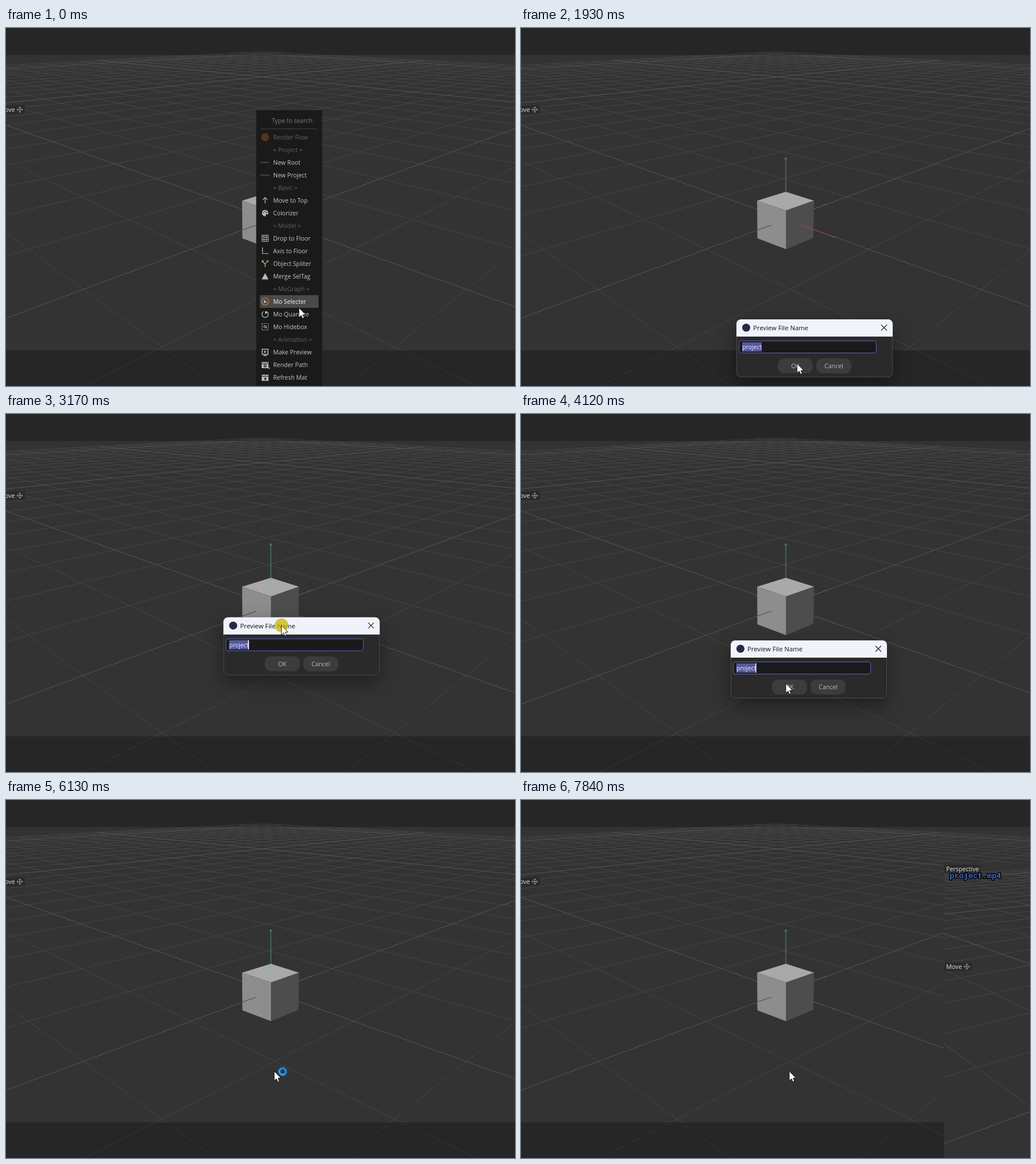
An HTML page for the animation above (8000 ms loop, 886 px wide and 623 px high).

```html
<!DOCTYPE html>
<html lang="en">
<head>
<meta charset="utf-8">
<title>Preview export</title>
<style>
html, body { margin: 0; width: 100%; height: 100%; overflow: hidden; background: #333; }
svg { display: block; width: 886px; height: 623px; }
text { font: 10.5px "Open Sans", "Noto Sans", sans-serif; white-space: pre; }
#dialog { filter: drop-shadow(0 12px 16px rgba(0,0,0,.4)); }
</style>
</head>
<body>
<svg id="stage" viewBox="0 0 886 623" fill="none"></svg>
<script>
const LOOP = 8000;

const rect = (x, y, w, h, fill, extra = '') =>
  `<rect x="${x}" y="${y}" width="${w}" height="${h}" fill="${fill}" ${extra}/>`;
const text = (x, y, str, fill, extra = '') =>
  `<text x="${x}" y="${y}" fill="${fill}" ${extra}>${str}</text>`;
const line = (d, color, width = 1, extra = '') =>
  `<path d="${d}" stroke="${color}" stroke-width="${width}" ${extra}/>`;
const shape = (d, fill) => `<path d="${d}" fill="${fill}"/>`;
const disc = (x, y, r, fill) => `<circle cx="${x}" cy="${y}" r="${r}" fill="${fill}"/>`;
const group = (id, body, extra = '') => `<g id="${id}" ${extra}>${body}</g>`;

// Perspective floor: unit cells (a, b) projected to the screen.
function project(a, b) {
  const depth = 1 / (0.002912 - 0.0003807 * (a + b));
  return `${(440.3 + depth * (0.0596 + 0.3585 * (a - b))).toFixed(2)} ${(depth - 10).toFixed(2)}`;
}

function floorGrid() {
  const size = 22, paths = { minor: '', major: '' };
  for (let i = -size; i <= size; i++) {
    const end = Math.min(size, 7 - i);
    paths[i % 10 ? 'minor' : 'major'] +=
      `M${project(i, -size)}L${project(i, end)}M${project(-size, i)}L${project(end, i)}`;
  }
  return line(paths.minor, '#454545') + line(paths.major, '#565656');
}

const moveIcon = (x, y) => line(
  `M${x - 5} ${y}h10M${x} ${y - 5}v10` +
  `M${x - 3} ${y - 2}l-2 2 2 2M${x + 3} ${y - 2}l2 2-2 2` +
  `M${x - 2} ${y - 3}l2-2 2 2M${x - 2} ${y + 3}l2 2 2-2`, '#bbb', 0.8);

const moveLabel = (x, y) => rect(x - 3, y - 7.5, 48, 15, '#2a2a2a', 'rx="2"') +
  text(x, y + 4, 'Move', '#e0e0e0', 'style="font-size:10.8px"') + moveIcon(x + 36, y);

const cube = shape('M461 285L510 300.5L461.5 317.5L411 300.5Z', '#a9a9a9') +
  shape('M411 300.5L461.5 317.5V385L411.5 366Z', '#8d8d8d') +
  shape('M510 300.5L461.5 317.5V385L509 365Z', '#4d4d4d') +
  line('M411.5 351.5L436 343', '#454545') +
  line('M461 300V285', '#86b096') +
  line('M461 285V226M458.5 229l2.5-3.5 2.5 3.5', '#4f9c6c') +
  line('M510 314.5L530 307.5M526 307h7', '#4d566c') +
  group('redAxis', line('M487 343L545 363.5M542 364h7', '#b0463f')) +
  group('redAxisDim', line('M509 351L545 363.5M542 364h7', '#704441'));

// Menu entries: label, icon drawn around (0, 0).
const G = '#b9b9b9';
const clapper = shape('M-6-5h12v11h-12z', G) +
  line('M-5-3l2-2M-1-3l2-2M3-3l2-2M-6-1.7h12', '#1b1b1b');
const menuItems = [
  ['Render Flow', disc(0, 0, 7, '#56301f')],
  ['= Project ='],
  ['New Root', line('M-8 0H7', '#68747a', 1.5, 'stroke-dasharray="2 1"')],
  ['New Project', line('M-8 0H7', '#3c6a7c', 1.5, 'stroke-dasharray="3 1"')],
  ['= Basic ='],
  ['Move to Top', line('M0 5.5V-5M-4-1L0-5 4-1', G, 1.2)],
  ['Colorizer', disc(0, 0, 5.5, G) + disc(-2.5, -1, 1, '#222') + disc(0, -3, 1, '#222') +
    disc(2.7, -1, 1, '#222') + disc(3, 4, 2, '#1b1b1b')],
  ['= Model ='],
  ['Drop to Floor', line('M-5.5-5.5h11v11h-11zM-2-5.5v11M2-5.5v11M-5.5-2h11M-5.5 2h11', '#a9b8bd')],
  ['Axis to Floor', line('M-4.5-6V4.5H6', G, 1.2)],
  ['Object Spliter', line('M0 6V1L-5-5M-5-2v-3h3', G, 1.2) + line('M0 1L5-5M2-5h3v3', '#c98a45', 1.2)],
  ['Merge SelTag', shape('M0-5.5L6 5.5H-6Z', G)],
  ['= MoGraph ='],
  ['Mo Selecter', line('M-6 0a6 6 0 1 0 12 0a6 6 0 1 0-12 0', '#c8813c', 1.2) + shape('M-2-3L3 1-2 3Z', G)],
  ['Mo Quantize', line('M-3-4.5A5.5 5.5 0 1 0 3-4.5', G, 1.3) + shape('M0 0V-5.5A5.5 5.5 0 0 1 4.5-3Z', G)],
  ['Mo Hidebox', line('M-5.5-5.5h11v11h-11z', G, 1, 'stroke-dasharray="1.5 1"') +
    line('M-3 0Q0-3.5 3 0Q0 3.5-3 0M-2-3L3 3', G)],
  ['= Animation ='],
  ['Make Preview', line('M-5-5h10v9h-10zM-3 6h6', G, 1.5) + shape('M-1.5-3L2.5-.5-1.5 2Z', G)],
  ['Render Path', clapper + disc(0, 2, 2.5, '#1b1b1b') + disc(0, 2, 1.2, G) + shape('M8 4v3H5Z', G)],
  ['Refresh Mat', clapper + shape('M-1 0L3 2.5-1 5Z', '#1b1b1b')],
];
const rowY = i => 190 + 22 * i;
const isHeading = i => !menuItems[i][1];

const menu = rect(435.5, 143, 115, 490, '#1a1a1a') +
  text(498, 165, 'Type to search', '#7d7d7d', 'text-anchor="middle" font-style="italic"') +
  line('M444 175.5H542', '#453f3b') +
  rect(442, 0, 102, 22, '#4a4a4a', 'id="hover"') +
  menuItems.map(([label, icon], i) =>
    (icon ? `<g transform="translate(451 ${rowY(i)})">${icon}</g>` : '') +
    text(465, rowY(i) + 4, label, !icon || i === 0 ? '#626262' : '#c6c6c6', 'class="item"')).join('');

const button = (x, label) => rect(x, 68, 61, 26, '#3c3c3c', 'rx="11"') +
  text(x + 30.5, 85, label, '#b9bace', 'text-anchor="middle"');

const dialog = rect(0.5, 0.5, 271, 100, '#2a2a2a', 'rx="7.5" stroke="#4b4b4b"') +
  shape('M0 30V8a8 8 0 0 1 8-8H264a8 8 0 0 1 8 8V30Z', '#f0f3fa') +
  disc(17, 14.5, 7, '#252b45') +
  text(29, 19, 'Preview File Name', '#111', 'style="font-size:11.3px"') +
  line('M252 9.5l10 10M262 9.5l-10 10', '#222', 1.1) +
  rect(4.5, 37.5, 239, 21, '#1a1a1c', 'rx="4" stroke="#5f64b8"') +
  rect(10, 40, 34, 16, '#55589f') +
  text(10, 52, 'project', '#f4f4f4') +
  rect(43, 40, 1.5, 16, '#fff', 'id="caret"') +
  button(72, 'OK') + button(139, 'Cancel');

const player = rect(736, 110, 160, 399, '#000') +
  rect(739, 113, 88, 30, '#1c1c1c') + rect(828, 113, 60, 30, '#1c1c1c') +
  text(750, 132, 'Mornvista', '#c8c8c8', 'style="font-size:11.3px"') +
  line('M810 126.5l3.5 3.5 3.5-3.5', '#c8c8c8') +
  rect(740, 144, 150, 300, '#101010') + disc(840, 295, 32, '#333') +
  rect(740, 445, 150, 20, '#1a1a1a') + rect(744, 454, 150, 2, '#000') +
  [739, 780, 821, 862].map(x => rect(x, 466, 40, 40, '#1e1e1e')).join('') +
  shape('M756 481L764.5 486 756 491Z', '#fff') + rect(796, 482, 8, 8, '#fff') +
  shape('M837 482h1.5v8H837zM845 482v8l-6-4z', '#fff') +
  shape('M877.500 482v8l6-4zM884 482h1.500v8H884z', '#fff');

const video = rect(736, 110, 150, 513, '#333') +
  '<use href="#floor" transform="translate(751.8 59.4) scale(1.055)"/>' +
  rect(737, 113, 63, 14, '#2a2a2a', 'rx="2"') +
  text(740, 124, 'Perspective', '#e0e0e0', 'style="font-size:10.7px"') +
  moveLabel(740, 290) +
  group('fileName', text(746, 136, 'project.mp4', '#4e68d8',
    `style="font:bold 13.6px 'Liberation Mono',monospace" stroke="#000" stroke-width="3" stroke-linejoin="round" paint-order="stroke"`));

const pointer = group('arrow',
    '<path d="M0 0V16.500L3.800 13 6.200 18.500 8.900 17.400 6.500 12H11.500Z" fill="#fff" stroke="#000" stroke-width=".8"/>') +
  group('beam', line('M-3.500-7H3.500M0-7V7M-3.500 7H3.500', '#000', 2.4) +
    line('M-3.500-7H3.500M0-7V7M-3.500 7H3.500', '#f2f2f2', 1.2)) +
  group('ring', '<circle r="5.700" stroke="#2f9af2" stroke-width="3.600"/>' +
    '<path id="ringArc" d="M5.700 0A5.700 5.700 0 0 1-5.700 0" stroke="#1b82dc" stroke-width="3.600"/>',
    'transform="translate(14.500 .500)"');

document.getElementById('stage').innerHTML =
  '<clipPath id="videoClip"><rect x="736" y="110" width="150" height="513"/></clipPath>' +
  rect(0, 0, 886, 623, '#333') + group('floor', floorGrid()) +
  rect(0, 0, 886, 47, '#000', 'opacity=".25"') + rect(0, 561, 886, 62, '#000', 'opacity=".25"') +
  cube + moveLabel(-12, 142) +
  group('menu', menu) + group('dialog', dialog) +
  group('player', player) + group('video', video, 'clip-path="url(#videoClip)"') +
  '<circle id="press" r="12" fill="#c8b800" opacity=".75"/>' + group('pointer', pointer);

const byId = id => document.getElementById(id);
const set = (id, name, value) => byId(id).setAttribute(name, value);
const show = (id, on) => set(id, 'display', on ? 'inline' : 'none');
const clamp = v => Math.max(0, Math.min(1, v));
const ramp = (t, from, to) => clamp((t - from) / (to - from));
const between = (t, from, to) => t >= from && t < to;

// Keys are [time, x, y]; positions move linearly from key to key.
const pointerKeys = [
  [70, 510, 487], [420, 514, 562], [1360, 514, 562], [1640, 481, 591], [1860, 481, 591],
  [2560, 477, 522], [2690, 477, 522], [2760, 489, 469], [2970, 491, 350], [3160, 480, 366],
  [3440, 466, 408], [3510, 466, 408], [3780, 464, 442], [3980, 464, 442], [4120, 461, 469],
  [4320, 467, 472],
];
const dialogKeys = [
  [2690, 375, 507], [2760, 387, 466], [2970, 390, 336], [3160, 379, 352], [3440, 365, 394],
];

function track(keys, t) {
  const next = keys.findIndex(k => k[0] > t);
  if (next === 0) return keys[0].slice(1);
  if (next < 0) return keys[keys.length - 1].slice(1);
  const [from, to] = [keys[next - 1], keys[next]];
  const p = ramp(t, from[0], to[0]);
  return [1, 2].map(i => from[i] + (to[i] - from[i]) * p);
}

const items = document.querySelectorAll('.item');

function draw(t) {
  const [px, py] = track(pointerKeys, t);
  const [dx, dy] = track(dialogKeys, t);

  show('menu', t < 820);
  const row = Math.floor((py - 179) / 22 - 0.01);
  const active = row >= 0 && row < menuItems.length && !isHeading(row);
  show('hover', active);
  if (active) set('hover', 'y', rowY(row) - 11);
  items.forEach((item, i) => { item.style.fill = active && i === row ? '#f4f4f4' : ''; });

  const dialogOpen = between(t, 820, 4660);
  const closing = ramp(t, 4520, 4660);
  const scale = 1 - 0.12 * (1 - ramp(t, 820, 1100)) ** 3 - 0.08 * closing;
  show('dialog', dialogOpen);
  set('dialog', 'opacity', ramp(t, 790, 930) * (1 - closing));
  set('dialog', 'transform',
    `translate(${dx + 136} ${dy + 50.5}) scale(${scale}) translate(-136 -50.5)`);
  show('caret', Math.floor((t - 900) / 530) % 2 === 0);

  show('redAxis', t < 3090);
  show('redAxisDim', t >= 3090);

  const overField = dialogOpen && between(px - dx, 4, 244) && between(py - dy, 37, 59);
  set('pointer', 'transform', `translate(${px} ${py})`);
  show('arrow', !overField);
  show('beam', overField);
  show('ring', between(t, 4660, 6810));
  set('ringArc', 'transform', `rotate(${ramp(t, 4930, 6410) * 720})`);
  set('press', 'cx', px);
  set('press', 'cy', py);
  show('press', between(t, 750, 820) || between(t, 2690, 3440) || between(t, 4520, 4590));

  show('player', between(t, 6740, 7570));
  set('player', 'opacity', ramp(t, 6700, 6880));
  show('video', t >= 7570);
  show('fileName', t >= 7840);
}

const start = performance.now();
function tick() {
  draw((performance.now() - start) % LOOP);
  requestAnimationFrame(tick);
}
tick();
</script>
</body>
</html>
```
